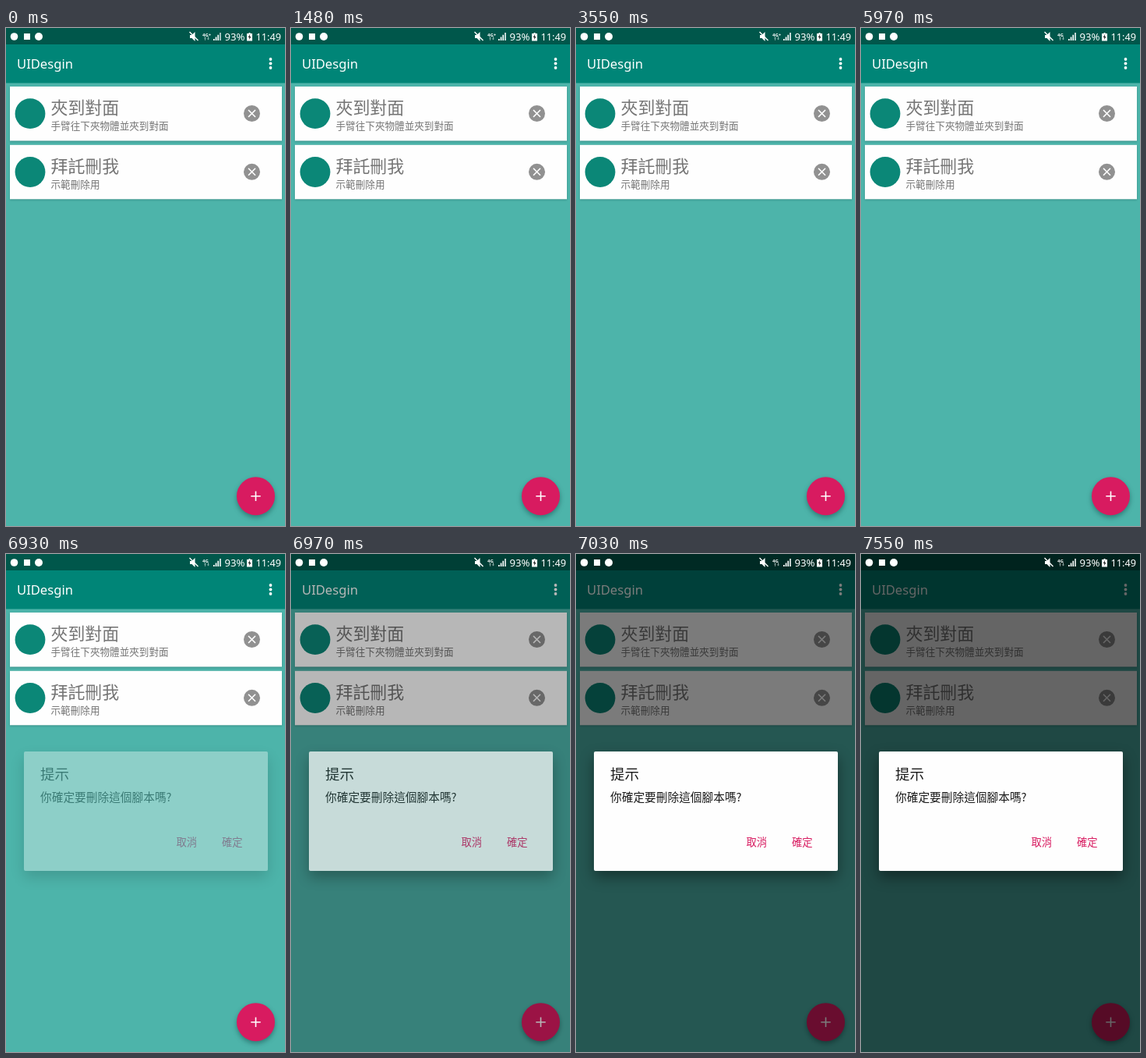
These frames come from a looping animation (358x638 px, 8 s). An HTML page:

```html
<!DOCTYPE html>
<html lang="zh-Hant">
<head>
<meta charset="utf-8">
<title>UIDesgin</title>
<style>
html, body { margin: 0; width: 100%; height: 100%; overflow: hidden; }
svg { display: block; width: 100%; height: 100%; }
text { font-family: "Noto Sans", "Noto Sans CJK TC", "Noto Sans CJK", sans-serif; white-space: pre; }
.cjk { font-family: "Noto Sans CJK TC", "Noto Sans CJK", "Noto Sans", sans-serif; }
.page { fill: #4db4aa; }
.status { fill: #00574b; }
.bar { fill: #008577; }
.white { fill: #fff; }
.card { fill: #fefefe; filter: drop-shadow(0 1px 1px rgba(0, 50, 50, .3)); }
.ink { fill: #757575; }
.badge { fill: #0b8777; }
.close { fill: #919191; }
.cross, .plus { stroke: #fff; stroke-width: 1.6; }
.fab { fill: #d81b60; filter: drop-shadow(0 3px 3px rgba(0, 40, 40, .4)); }
.box { fill: #fefefe; filter: drop-shadow(0 8px 9px rgba(0, 0, 0, .4)); }
.black { fill: #1a1a1a; }
.action { fill: #d81b60; font-size: 13.3px; font-weight: 500; }
</style>
</head>
<body>
<svg viewBox="0 0 358 638" preserveAspectRatio="none">
  <defs>
    <g id="item">
      <rect class="card" x="5" y="75" width="349" height="69.5"/>
      <circle class="badge" cx="31" cy="109.7" r="19.4"/>
      <circle class="close" cx="315.5" cy="109.5" r="10.5"/>
      <path class="cross" d="M311 105l9 9m0-9l-9 9"/>
    </g>
  </defs>

  <rect class="page" width="358" height="638"/>
  <rect class="bar" y="21" width="358" height="49.5"/>
  <rect class="status" width="358" height="21"/>

  <g class="white">
    <text x="14" y="52" font-size="16.6">UIDesgin</text>
    <circle cx="339.5" cy="40" r="1.9"/>
    <circle cx="339.5" cy="45.5" r="1.9"/>
    <circle cx="339.5" cy="51" r="1.9"/>
  </g>

  <use href="#item"/>
  <use href="#item" y="74.8"/>
  <g class="ink">
    <text class="cjk" x="57.5" y="110" font-size="21.9">夾到對面</text>
    <text class="cjk" x="57.5" y="130.4" font-size="12.6">手臂往下夾物體並夾到對面</text>
    <text class="cjk" x="57.5" y="184.8" font-size="21.9">拜託刪我</text>
    <text class="cjk" x="57.5" y="205.2" font-size="12.6">示範刪除用</text>
  </g>

  <circle class="fab" cx="320.5" cy="599.7" r="24.5"/>
  <path class="plus" d="M314.3 599.7h12.4m-6.2-6.2v12.4"/>

  <rect id="dim" width="358" height="638"/>

  <g class="white">
    <circle cx="10.5" cy="11" r="4.8"/>
    <rect x="23" y="7" width="8" height="8"/>
    <circle cx="42" cy="11" r="5"/>
    <path d="M236 9h2.5l4-4v12l-4-4h-2.5z"/>
    <path d="M235 5.5l1-1 11 11-1 1z"/>
    <path d="M254 13.2l1.5-2 1.5 2h-1v2.6h-1v-2.6zM258 13.6h1v-2.6h1v2.6h1l-1.5 2z" opacity=".55"/>
    <path d="M266 14h1.7v2h-1.7zM268.7 11.5h1.7v4.5h-1.7zM271.4 8.8h1.7v7.2h-1.7z"/>
    <path id="signal" d="M274.1 6h1.8v10h-1.8z"/>
    <path d="M311.5 6h2v1h2.5v9.5h-7v-9.5h2.5z"/>
    <text id="net" x="252" y="10.5" font-size="6" font-weight="600"></text>
    <text x="280.5" y="16" font-size="13.2">93%</text>
    <text x="320.5" y="16" font-size="12.7">11:49</text>
  </g>
  <path d="M313.2 7.8l-2.4 4.2h1.6l-.6 3.2 2.6-4.3h-1.7z" class="black"/>

  <g id="dialog">
    <rect class="box" x="23" y="253" width="313" height="153" rx="2"/>
    <text class="cjk black" x="44" y="289" font-size="18.4">提示</text>
    <text class="cjk black" x="44" y="317.3" font-size="14.7">你確定要刪除這個腳本嗎?</text>
    <text class="cjk action" x="218.5" y="373.5">取消</text>
    <text class="cjk action" x="277" y="373.5">確定</text>
  </g>
</svg>
<script>
const LOOP = 8000;
const STEPS = [0, 6900, 6930, 6970, 7000, 7030, 7070, 7100, 7140];

const $ = (id) => document.getElementById(id);
const progress = (t, from, to) => Math.max(0, Math.min(1, (t - from) / (to - from)));
const easeOut = (p) => 1 - (1 - p) ** 3;
const hold = (t) => STEPS.filter((s) => s <= t).pop();

function draw(t) {
  const s = hold(t);
  $("dialog").style.opacity = progress(s, 6890, 7000);
  $("dim").style.opacity = .6 * easeOut(progress(s, 6930, 7140));
  $("net").textContent = t < 5970 ? "4G+" : "4G";
  $("signal").style.opacity = t < 1480 ? .7 : .85;
}

const start = performance.now();
function tick() {
  draw((performance.now() - start) % LOOP);
  requestAnimationFrame(tick);
}
tick();
</script>
</body>
</html>
```
